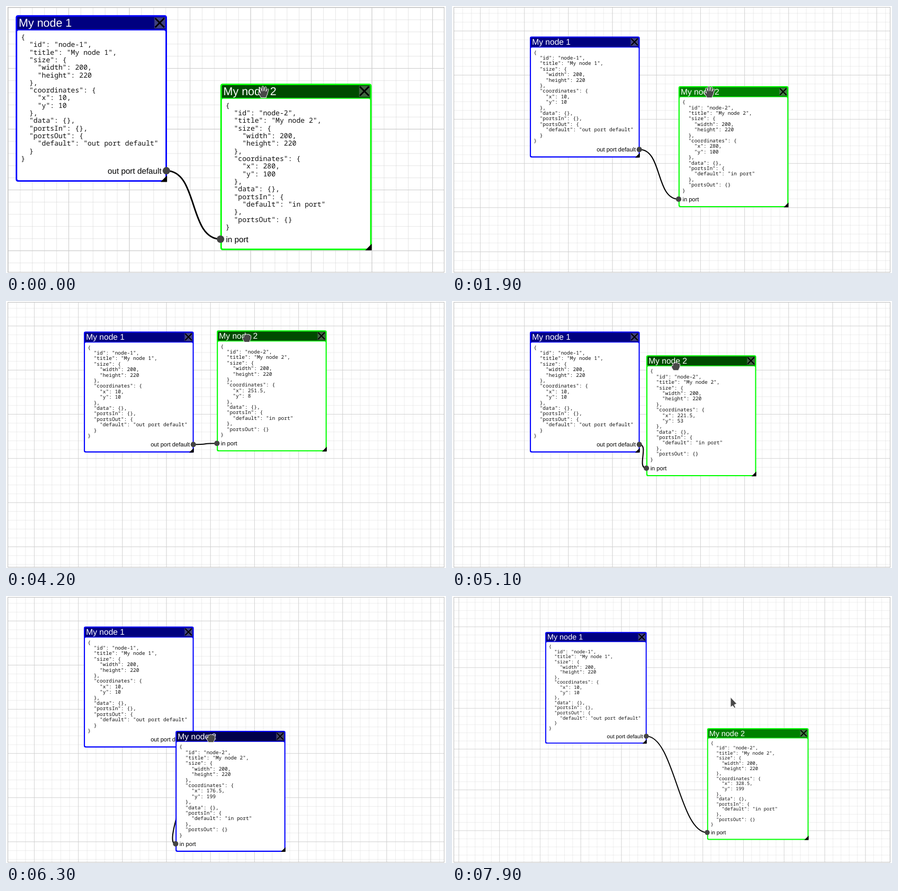
Write an HTML page that moves like this. It is 831x503 px and loops after 8 s.

```html
<!DOCTYPE html>
<html lang="en">
<head>
<meta charset="utf-8">
<title>Node editor</title>
<style>
html, body { margin: 0; width: 100%; height: 100%; overflow: hidden; background: #fff; }
svg { display: block; width: 831px; height: 503px; }
text { text-rendering: geometricPrecision; }
.title { font: 15px "Liberation Sans", Arial, sans-serif; fill: #fff; }
.port { font: 10.667px "Liberation Sans", Arial, sans-serif; }
.json { font: 9.17px "Noto Sans Mono", "Liberation Mono", monospace; fill: #111; }
</style>
</head>
<body>
<svg viewBox="0 0 831 503">
  <defs><clipPath id="area"><rect x="4" y="3" width="823" height="498"/></clipPath></defs>
  <g clip-path="url(#area)">
    <path id="minor" stroke="#ccc" fill="none"/>
    <path id="major" stroke="#ccc" fill="none"/>
    <g id="world">
      <path id="link" fill="none" stroke="#000" stroke-width="2"/>
      <g id="node1"></g>
      <g id="node2"></g>
    </g>
  </g>
  <rect x="3.5" y="2.5" width="824" height="499" fill="none" stroke="#bdbdbd"/>
  <g id="cursor" fill="#484848" stroke="#fff" stroke-linejoin="round">
    <path id="open" d="M-4.5 10.8 C-5.5 7.5 -8.6 4.5 -9.8 1.6 C-10.4 -.6 -7.8 -1 -6.5 1 L-5.3 2.5 L-7.2 -5.2 C-7.7 -8 -4.8 -8.8 -4 -6.2 L-2.5 -1.5 L-2.6 -9 C-2.6 -11.6 .6 -11.6 .8 -9 L1.1 -1.8 L2.6 -8.4 C3.2 -10.8 6.1 -10.2 5.7 -7.6 L4.9 -1 L7 -4.8 C8.2 -7 10.6 -5.8 9.7 -3.5 C8.3 .4 8.4 4.3 6 7.6 L5.4 10.8 Z"/>
    <path id="fist" d="M-4.6 7.8 C-5.2 5.2 -8 3.6 -8 .6 C-8 -1.6 -6.5 -2 -5.6 -1.2 L-5.7 -4.2 C-5.6 -6.6 -3 -7 -2.2 -5.6 C-1.8 -8 1.2 -8 1.7 -5.9 C2.5 -7.7 5 -7 5.1 -5 C6.3 -6.1 8 -5.2 8 -3.4 C8.2 1 7.3 3.5 5.6 5.6 L5.2 7.8 Z"/>
    <path id="arrow" d="M0 0 V19 L4.2 16 L7.5 20.8 L9.5 19.6 L7.2 14.4 L11.8 12.6 Z"/>
  </g>
</svg>
<script>
const LOOP = 8000, TICK = 100, SCALE = 1.4315, ZOOM_STEP = 1.0832;
const $ = id => document.getElementById(id);
const show = (id, on) => $(id).setAttribute("display", on ? "inline" : "none");
const mix = (a, b, k) => a + (b - a) * Math.min(1, Math.max(0, k));

// Each pull: start, end, then the place it brings the node to.
const pulls = [
  [2200, 2400, 283.5, 94.5],
  [2700, 3200, 291.5, 21],
  [3300, 3600, 280.5, 4],
  [3800, 4600, 221.5, 12],
  [4900, 5100, 221.5, 53],
  [5100, 5700, 157.5, 191],
  [5700, 5900, 124.5, 199],
  [6100, 6800, 307.5, 199],
  [6800, 7000, 328.5, 199]
];

function nodeAt(t) {
  let x = 280, y = 100;
  for (const [from, to, px, py] of pulls) {
    if (t <= from) break;
    const k = (t - from) / (to - from);
    x = mix(x, px, k);
    y = mix(y, py, k);
  }
  if (t > 2200) x = Math.round(x - .5) + .5;
  return { x, y: Math.round(y) };
}

function viewAt(t) {
  const v = { s: SCALE, x: 4, y: 3 };
  const zoomOut = (px, py) => {
    v.x = px - (px - v.x) / ZOOM_STEP;
    v.y = py - (py - v.y) / ZOOM_STEP;
    v.s /= ZOOM_STEP;
  };
  for (const at of [800, 900, 1000, 1200]) if (t >= at) zoomOut(488.8, 164);
  if (t >= 7900) zoomOut(525, 190);
  return v;
}

// While dragging, the node trails behind the hand.
function cursorAt(t, v, node) {
  if (t <= 2200) return [486, 162];
  if (t >= 7600) {
    const k = (t - 7600) / 200;
    return [mix(533, 526, k), mix(245, 190.5, k)];
  }
  const next = nodeAt(t + TICK);
  const lag = (now, then) => .3 * (then - now);
  return [
    v.x + node.x * v.s + 59 + lag(node.x, next.x),
    v.y + node.y * v.s + 14 + lag(node.y, next.y)
  ];
}

function nodeJson(n, { x, y }, portsIn, portsOut) {
  const node = {
    id: "node-" + n, title: "My node " + n, size: { width: 200, height: 220 },
    coordinates: { x, y }, data: {}, portsIn, portsOut
  };
  return JSON.stringify(node, null, 2).split("\n");
}

function setJson(el, lines) {
  el.querySelector(".json").innerHTML = lines.map((line, i) => {
    const text = line.trimStart(), indent = line.length - text.length;
    return `<text x="${6.9 + indent * 5.5}" y="${31.9 + i * 10}">${text}</text>`;
  }).join("");
}

function buildNode(el, n, label, isOut) {
  el.innerHTML = `
    <rect class="edge" width="199.6" height="219.2" rx="3"/>
    <path class="head" d="M2 18.7 V3.5 Q2 2 3.5 2 H196.1 Q197.6 2 197.6 3.5 V18.7 Z"/>
    <rect x="2" y="20" width="195.6" height="197.2" rx="2" fill="#fff"/>
    <text class="title" x="4" y="15.2">My node ${n}</text>
    <rect x="183" y="3" width="14.3" height="14.3" fill="#808080" fill-opacity=".5"/>
    <path d="M184 4 L196 16 M196 4 L184 16" stroke="#000" stroke-width="2"/>
    <g class="json"></g>
    <path d="M199.7 210.8 V219.4 H191.2 Z"/>
    <text class="port" x="${isOut ? 192.4 : 7.4}" y="208.6" text-anchor="${isOut ? "end" : "start"}">${label}</text>
    <circle cx="${isOut ? 198.8 : .2}" cy="204.7" r="4.9" fill="#444"/>`;
}

function paint(el, edge, head) {
  el.querySelector(".edge").setAttribute("fill", edge);
  el.querySelector(".head").setAttribute("fill", head);
}

function drawGrid(id, v, gap, width) {
  const step = gap * v.s;
  let d = "";
  for (let x = v.x % step; x < 828; x += step) d += `M${x} 3V501`;
  for (let y = v.y % step; y < 502; y += step) d += `M4 ${y}H827`;
  $(id).setAttribute("d", d);
  $(id).setAttribute("stroke-width", width * v.s);
}

function drawLink({ x, y }) {
  const ax = 208.8, ay = 214.7, bx = x + .2, by = y + 204.7;
  const bend = 5 * Math.sqrt(Math.abs(bx - ax));
  $("link").setAttribute("d", `M${ax} ${ay} C${ax + bend} ${ay} ${bx - bend} ${by} ${bx} ${by}`);
}

function draw(time) {
  const t = Math.floor(time / TICK) * TICK;
  const v = viewAt(t), node = nodeAt(t), el = $("node2");

  $("world").setAttribute("transform", `translate(${v.x} ${v.y}) scale(${v.s})`);
  drawGrid("minor", v, 16, .35);
  drawGrid("major", v, 80, .7);
  drawLink(node);

  const hover = t !== 1900 && t < 7400;
  el.setAttribute("transform", `translate(${node.x} ${node.y})`);
  if (node.x < 200) paint(el, "#00f", hover ? "#00004a" : "#000080");
  else paint(el, "#0f0", hover ? "#004a00" : "#008000");
  setJson(el, nodeJson(2, node, { default: "in port" }, {}));

  const dragging = t >= 2300 && t < 7400, away = t >= 7600;
  $("cursor").setAttribute("transform", `translate(${cursorAt(t, v, node)})`);
  show("open", !dragging && !away);
  show("fist", dragging);
  show("arrow", away);
}

const first = $("node1");
buildNode(first, 1, "out port default", true);
buildNode($("node2"), 2, "in port", false);
first.setAttribute("transform", "translate(10 10)");
paint(first, "#00f", "#000080");
setJson(first, nodeJson(1, { x: 10, y: 10 }, {}, { default: "out port default" }));

const start = performance.now();
function tick() {
  draw((performance.now() - start) % LOOP);
  requestAnimationFrame(tick);
}
tick();
</script>
</body>
</html>
```
